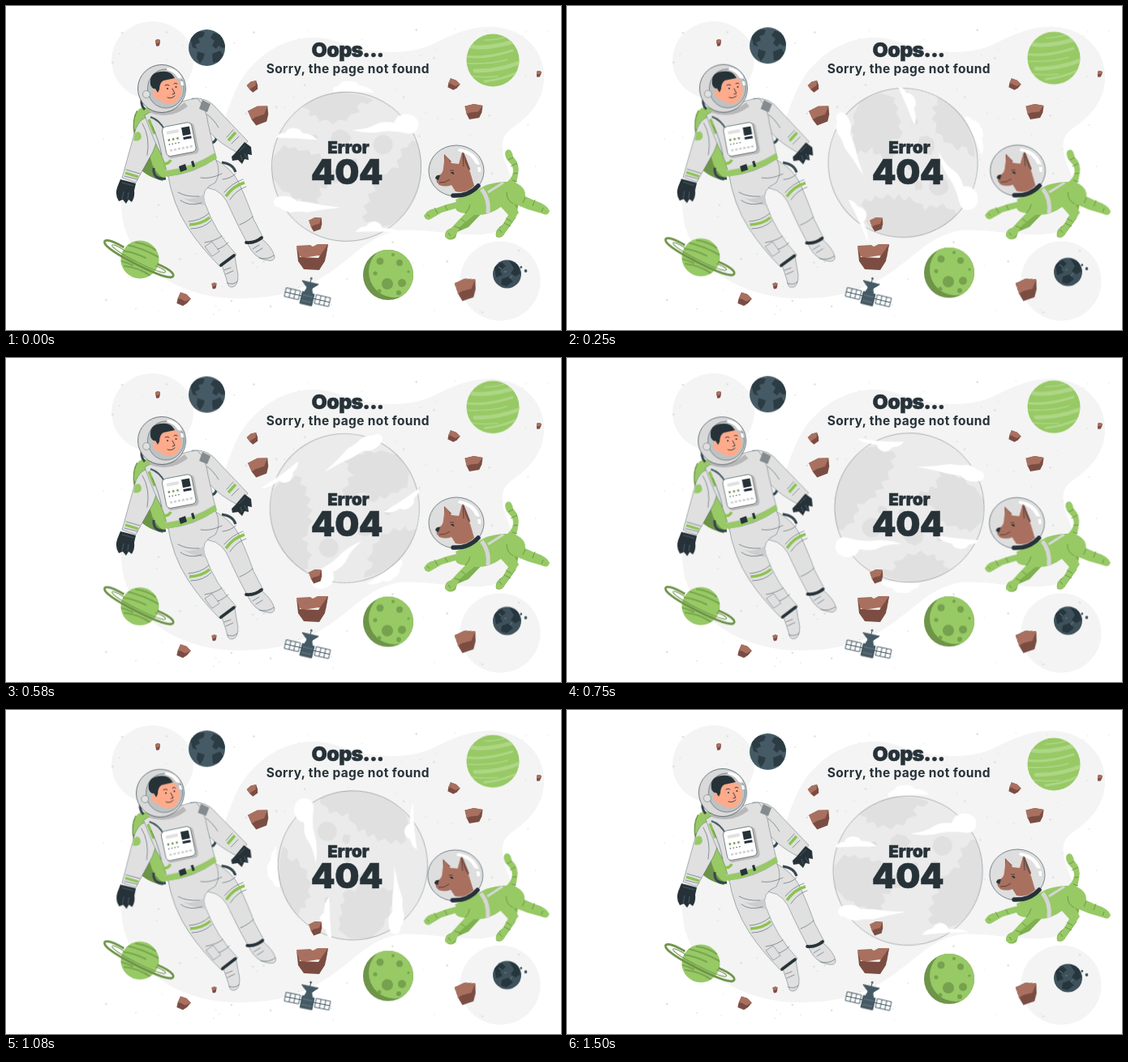
These frames come from a looping animation (684x400 px, 1540 ms). An HTML page:

```html
<!DOCTYPE html>
<html lang="en">
<head>
<meta charset="utf-8">
<title>Page not found</title>
<style>
  html, body { margin: 0; width: 100%; height: 100%; overflow: hidden; background: #fff; }
  svg { display: block; width: 684px; height: 400px; }
  text { font-family: Inter, "Open Sans", sans-serif; fill: #263238; text-anchor: middle; }
  .heavy { font-weight: 900; stroke: #263238; stroke-width: .5; }
  .blob { fill: #f4f4f4; }
  .suit { fill: #e0e0e0; stroke: #37474f; stroke-width: .4; }
  .fold { fill: none; stroke: #455a64; stroke-width: .6; stroke-linecap: round; }
  .dark { fill: #263238; }
  .slate { fill: #455a64; }
  .green { fill: #97c965; }
  .moss { fill: #6d9449; }
  .band { fill: none; stroke: #8bc34f; stroke-width: 3.4; }
  .shade { fill: #cdcdcd; }
  .sea { fill: #e0e0e0; }
  .white { fill: #fff; }
  .skin { fill: #ffab8b; }
  .fur { fill: #a9705f; }
  .fur2 { fill: #7b4d42; }
  #moon { transform-origin: 420.6px 191.5px; }
  #astronaut { transform-origin: 228px 215px; }
  #dog { transform-origin: 600px 275px; }
  #satellite { transform-origin: 371px 357px; }
</style>
</head>
<body>
<svg viewBox="0 0 684 400">
  <defs>
    <clipPath id="disc"><circle cx="419.6" cy="198.3" r="92"/></clipPath>
    <clipPath id="c1"><circle cx="247.5" cy="51.5" r="22.5"/></clipPath>
    <clipPath id="c2"><circle cx="600" cy="67" r="32.5"/></clipPath>
    <clipPath id="c3"><circle cx="165" cy="313" r="23.5"/></clipPath>
    <clipPath id="c4"><circle cx="471" cy="332" r="31"/></clipPath>
    <clipPath id="c5"><circle cx="617.5" cy="331" r="17.5"/></clipPath>
  </defs>

  <g class="blob">
    <ellipse cx="180.5" cy="67" rx="50.5" ry="48"/>
    <ellipse cx="609" cy="339.5" rx="49.5" ry="49"/>
    <path d="M262 158C275 130 280 95 307 70C335 41 375 33 405 43C440 56 485 64 524 48C552 34 572 25 600 25.500C640 29 663 55 663 88C663 120 640 140 622 152C605 165 612 185 620 205C632 235 632 265 610 277C580 290 520 274 485 277C445 283 425 315 385 338C350 357 320 361 285 361C215 360 160 325 145 270C135 225 150 165 200 160C225 157 245 165 262 158Z"/>
  </g>
  <g id="stars" fill="#e2e2e2"></g>

  <g id="moon">
    <circle cx="419.6" cy="198.3" r="92" fill="#ebebeb"/>
    <g class="sea" clip-path="url(#disc)">
      <path d="M343 172l5 4 8-2 5 5 12-1 3 6 10-2 5 8-4 8 8 5 10-1 6 9-3 8-10-1-3 8-9-2 3 10-6 5 4 9-9 5-9-6-6-9-10 1-3-8-9-2-14-19 3-24z"/>
      <path d="M512 168l-12-2-6 8-8 2 2 9-7 6 4 9-9-1-7 8-9 2 3 8-11 3 4 8-10 4 3 9-8 6 5 8-7 5 5 7 11-2 7 7 12-2 28-18 20-38z"/>
      <path d="M365 125Q385 106 412 107Q440 108 452 116L445 121L437 119L432 124L436 131L424 134L419 142L410 140L403 146L394 140L386 143L382 135L373 136L374 129Z"/>
      <path d="M402 157l8-5 10 3 6 8-5 6-9-1-6 4-6-7zM446 192l6-4 7 3-2 8-9-2zM424 190q6-4 9 1q-1 7-8 5z"/>
      <circle cx="464.500" cy="171" r="12"/>
      <circle cx="380" cy="163" r="4"/>
    </g>
    <circle cx="419.6" cy="198.3" r="92" fill="none" stroke="#37474f" stroke-width=".5" stroke-dasharray="1.6 .5"/>
    <g class="white">
      <path d="M402 106Q402 99 410 98Q413 92 422 93Q432 92 435 98Q447 99 453 107Q430 104 402 106Z"/>
      <path d="M427 153Q445 152 454 147Q463 141 478 144Q482 132 495 133Q509 136 508 148Q506 159 494 157Q474 152 456 156Q440 157 427 153Z"/>
      <path d="M333 163Q334 157 344 157Q346 151 354 151Q363 151 365 157Q378 158 384 166Q360 163 333 163Z"/>
      <path d="M330 241Q332 234 343 235Q352 234 358 241Q375 242 390 246L413 249Q390 251 372 255Q360 253 352 255Q342 254 338 249Q329 248 330 241Z"/>
      <path d="M431 279Q436 272 444 272Q449 265 456 266Q463 268 464 274Q478 273 489 280Q460 277 431 279Z"/>
    </g>
  </g>

  <text class="heavy" x="421" y="62.5" font-size="25" letter-spacing="-.7">Oops...</text>
  <text x="421.3" y="83" font-size="15.5" font-weight="700" letter-spacing=".35">Sorry, the page not found</text>
  <text class="heavy" x="422" y="181.5" font-size="20.5">Error</text>
  <text class="heavy" x="420" y="220" font-size="42.500" letter-spacing="-.5">404</text>

  <g class="float">
    <circle class="slate" cx="247.5" cy="51.5" r="22.5"/>
    <path clip-path="url(#c1)" fill="#2c3c44" d="M227 40L235 31L245 32L243 38L237 40L239 45L233 48L236 53L230 51ZM256 33L266 36L272 50L267 52L262 49L259 53L254 49L257 43L252 39ZM236 56L245 59L243 65L239 71L235 64ZM254 59L264 55L268 61L262 69L255 70Z"/>
  </g>
  <g class="float">
    <circle class="green" cx="600" cy="67" r="32.5"/>
    <g clip-path="url(#c2)" fill="none" stroke="#add685" stroke-linecap="round">
      <path stroke-width="5" d="M574 50Q594 54 632 42M578 80Q606 81 638 68"/>
      <path stroke-width="3" d="M565 62Q590 66 624 55M590 93Q610 91 628 83"/>
      <path stroke-width="1.6" d="M590 42Q605 42 616 38M568 71Q600 72 618 66M570 86Q586 89 606 87"/>
    </g>
  </g>
  <g class="float">
    <circle class="green" cx="165" cy="313" r="23.5"/>
    <g clip-path="url(#c3)" fill="none" stroke="#79a651" stroke-width="2.2" stroke-linecap="round">
      <path d="M150 295Q168 299 188 310M160 292Q174 294 184 301M143 302Q158 304 172 311M146 321Q164 323 178 333M142 315Q150 317 156 320"/>
    </g>
    <g transform="rotate(26.500 163.5 312)" fill="none" stroke="#6d9449">
      <path stroke-width="2.8" d="M141 307.500C119 306 113 310 118 314C130 321 196 321 209 315C215 311 209 306 187 307.500"/>
      <path stroke-width="1" d="M142 310.500C129 309 124 311 128 313C140 317.500 188 317.500 199 313.500C203 311 198 309 186 310.500"/>
    </g>
  </g>
  <g class="float">
    <circle class="moss" cx="471" cy="332" r="31"/>
    <circle class="green" cx="479" cy="328" r="32" clip-path="url(#c4)"/>
    <g fill="#76a14e">
      <circle cx="461" cy="315" r="4.500"/><circle cx="485" cy="317" r="4"/><circle cx="470" cy="343" r="7"/>
      <circle cx="488" cy="342" r="5"/><circle cx="477" cy="307" r="2"/><circle cx="455" cy="330" r="2.500"/>
      <circle cx="484" cy="354" r="3"/><circle cx="496" cy="328" r="1.600"/><circle cx="460" cy="352" r="2.500"/>
    </g>
  </g>
  <g class="float">
    <circle cx="617.5" cy="331" r="17.5" fill="#3f525c"/>
    <path clip-path="url(#c5)" fill="#26363e" d="M602 322L611 316L616 321L609 327L612 332L604 335ZM620 314L631 319L634 330L628 334L622 330L626 324ZM611 337L619 334L625 340L617 346L610 344Z"/>
    <path d="M607 322l4 3M621 336l3-3M614 328h3" stroke="#64808d" stroke-width="1"/>
    <circle class="slate" cx="634.8" cy="322.5" r="1.4"/>
    <circle class="slate" cx="640.5" cy="327" r="1.9"/>
  </g>

  <g id="rocks"></g>
  <g>
    <path class="fur" d="M358 296L375 295L378 297L384 294L397 294L394 311L385 308L366 311L361 308Z"/>
    <path class="fur2" d="M358 296L362 310L385 311L397 294L393 315L386 326L367 325L360 315Z"/>
  </g>

  <g id="satellite">
    <g transform="rotate(13 372 357)" stroke="#455a64">
      <path class="slate" d="M364.500 354h15v15h-15zM361 341h21l-7 7 2 6h-10l2-6z"/>
      <path fill="none" stroke-width="1" d="M371.500 341v-5M380 359.500h3M365 359.500h-4M344 354h18v11h-18zM344 359.500h18M350 354v11M356 354v11M382 354h18v11h-18zM382 359.500h18M388 354v11M394 354v11"/>
      <path fill="none" stroke="#8298a2" stroke-width=".6" d="M366 358h12M366 365h12"/>
      <circle class="slate" cx="371.500" cy="336" r="1"/>
    </g>
  </g>

  <g id="astronaut">
    <path class="moss" d="M161 129Q154 140 158 160L160 195Q170 210 193 216L204 200L186 140Z"/>
    <path class="green" d="M164 127Q173 123 183 128L204 200L195 213Q182 206 178 188L170 158L158 152Q157 136 164 127Z"/>
    <path fill="none" stroke="#37474f" stroke-width="3" d="M171 128Q164 120 169 112M248 153Q260 154 259 164Q257 170 249 169M182 200Q181 215 197 213M266 193Q280 195 283 205"/>
    <path class="suit" d="M257 189Q278 200 287 218Q299 245 305 263L317 286L298 294Q286 272 277 252Q268 227 250 225Q236 220 236 205Z"/>
    <path class="suit" d="M199 205L258 188Q266 205 258 218Q239 226 245 243Q258 280 284 307L264 322Q240 298 225 275Q205 245 199 205Z"/>
    <path class="suit" d="M174 137Q162 141 158 158L143 212L160 218Q171 198 181 180L189 158Z"/>
    <path class="suit" d="M229 114Q249 112 261 128L298 167L285 181Q264 170 252 157L236 142Z"/>
    <path class="suit" d="M171 135Q184 126 198 127Q218 115 236 114Q247 126 249 145L259 188Q232 207 199 210Q196 190 186 173Q176 150 171 135Z"/>
    <path class="shade" d="M196 203L198 209Q232 206 259 188L257 181Q230 198 196 203ZM218 237Q230 240 243 233L246 246Q232 245 218 237Z"/>
    <path class="green" d="M195 204Q231 199 258 181L260 188Q231 206 198 211ZM159 157Q166 152 167 162Q165 168 157 166Z"/>
    <path class="dark" d="M213 198l8-3 2 7-8 3zM228 192l3-1 2 7-3 1z"/>
    <path class="band" d="M226 270Q242 269 251 261M271 235Q280 222 294 218M147 206L163 211M274 166L283 156M176 140Q180 150 183 158M194 194Q200 196 203 190"/>
    <path class="fold" d="M225 266Q240 265 250 256M269 230Q278 219 292 214M228 275Q243 275 253 265M276 239Q284 227 296 223M148 202L165 207M146 210L162 214M272 162L280 153M278 170L287 161M215 240Q226 248 241 243M212 230Q222 236 238 235M240 212Q252 214 266 207M267 214Q277 213 283 207M168 145Q178 162 174 184M180 148Q188 164 192 184M248 134Q256 140 262 150M245 292Q258 290 266 284M252 303Q266 300 274 292M288 270Q298 266 304 260"/>
    <path class="suit" d="M245 297l9-6 9 12-9 6z"/>
    <path fill="#848b8e" d="M242 116L252 121L248 131L238 127Z"/>
    <path fill="none" stroke="#455a64" stroke-width="2" d="M178 137Q190 141 196 154"/>
    <g transform="rotate(-11 214 166)">
      <rect x="196" y="147" width="39" height="39" rx="5" fill="#bababa"/>
      <rect x="195" y="146" width="37" height="37" rx="5" class="white" stroke="#37474f" stroke-width=".6"/>
      <path class="dark" d="M219 151h10v10h-10zM219 163h10v3h-10z"/>
      <path fill="none" stroke="#e0e0e0" stroke-width="4" d="M200 154h15"/>
      <path fill="none" stroke="#6d9449" stroke-width="2.4" stroke-dasharray="2.4 3" d="M200 163h16"/>
      <path fill="none" stroke="#455a64" stroke-width="1.4" stroke-dasharray="1.4 2.500" d="M200 168.500h15"/>
      <path fill="none" stroke="#d0d0d0" stroke-width="2.600" stroke-dasharray="3 2" d="M200 176h28"/>
    </g>
    <path class="dark" d="M141 214L160 219L158 228Q159 236 155 242L151 239L148 244L144 239L139 241Q134 234 137 224Z"/>
    <path class="dark" d="M283 181L294 168L302 174L303 184L298 183L299 190L294 189L291 195L286 190L279 191L278 186Z"/>
    <path fill="none" stroke="#546e7a" stroke-width=".7" d="M143 218l14 4M145 229l-2 9M151 230l-1 8M287 180l8-8M294 182l3 6M289 184l2 6"/>
    <path class="suit" d="M266 320L282 309Q284 322 286 332Q286 346 279 347Q273 348 272 338Z"/>
    <path class="suit" d="M298 294L316 288Q328 298 331 309Q331 316 322 314Q306 312 298 294Z"/>
    <path class="fold" d="M269 326l8-3M271 331l9-4M273 342q7 3 12-2M304 300l8-5M308 304l8-5M312 311q10 3 18-3"/>
    <path fill="none" stroke="#263238" stroke-width="3.800" stroke-linecap="round" d="M265 320L281 308M296 292Q307 293 315 286"/>
    <path fill="#b8b8b8" d="M176 126Q200 137 220 119L224 124Q202 141 178 132Z"/>
    <circle cx="192" cy="102" r="29.500" fill="#d9d9d9" stroke="#37474f" stroke-width=".7"/>
    <ellipse cx="197" cy="102" rx="22.500" ry="24" fill="#bfc1c2" stroke="#455a64" stroke-width=".6"/>
    <path class="skin" d="M184 94Q192 84 207 88Q215 93 216 105Q214 118 205 121Q195 121 188 115Q180 113 181 106Q182 102 186 104Z"/>
    <path class="dark" d="M178 97Q176 82 191 81Q203 79 208 89Q199 91 194 92Q189 95 189 103L187 107L184 102Q180 103 178 97Z"/>
    <path fill="none" stroke="#263238" stroke-width=".9" stroke-linecap="round" d="M196 98q3-2 5 0M207 96q2-2 4 0M199 113q5 2 9-2M205 102l3 6-3 1"/>
    <circle class="dark" cx="199" cy="102" r="1"/><circle class="dark" cx="209.500" cy="100" r="1"/>
    <path class="white" d="M199 76Q213 78 217 90L212 89Q207 81 198 79ZM215 93l3 0 1 5-3 0z"/>
    <circle class="suit" cx="173" cy="109" r="4.500"/>
  </g>

  <g id="dog">
    <ellipse cx="555" cy="203.500" rx="34" ry="31.500" fill="#dedede" stroke="#455a64" stroke-width=".7"/>
    <path class="fur2" d="M540 198L540 183L549 192ZM559 194L563 178L572 201L568 212Z"/>
    <path class="fur" d="M539 200L541 184L549 194L558 195L563 178Q564 194 572 205L577 222Q567 232 554 229L549 221Q542 224 534 221Q528 216 532 210Q539 207 539 200Z"/>
    <path class="dark" d="M529 213Q530 208 535 209L533 215ZM548 206a2 2 0 1 1 4 2z"/>
    <path fill="none" stroke="#263238" stroke-width=".7" d="M534 218Q541 219 547 214M547 203l5 0M563 182l1 16"/>
    <path class="white" d="M558 176Q578 178 584 196L579 195Q573 182 557 179ZM581 199l4 0 0 6-3 0z"/>
    <g fill="#7fb04f">
      <path d="M571 248L559 268L551 274Q541 275 541 284Q546 292 554 286L556 279L570 273L588 254Z"/>
      <path d="M616 243L621 258L612 270Q602 276 604 285Q611 288 615 280L628 262L632 243Z"/>
    </g>
    <g class="green">
      <path d="M617 218Q629 207 623 196L617 189Q613 181 617 178Q623 175 625 186Q634 195 631 208Q630 220 622 227Z"/>
      <path d="M554 239Q575 230 592 221Q615 214 630 219Q641 225 640 235L651 240Q667 245 670 253Q668 260 660 256L643 251L626 244L632 255L619 273L614 281Q610 287 604 284Q604 277 611 272L619 258L610 248Q596 259 577 258L560 272L554 283Q548 291 541 285Q541 277 548 275L559 263L566 256Q555 255 554 250L537 255L525 262Q518 267 515 259Q519 251 529 250L543 245L555 242Z"/>
    </g>
    <path fill="none" stroke="#d5d5d5" stroke-width="5" d="M586 226Q596 238 594 256"/>
    <path fill="none" stroke="#d5d5d5" stroke-width="3" d="M594 230L613 218"/>
    <path fill="none" stroke="#5c813c" stroke-width=".7" d="M553 272l8 3M528 249l4 7M614 268l8 4M652 239l-3 8M566 256Q571 251 572 245M625 244Q617 240 617 230M619 190l6-3M622 198l8-4M625 207l6-1M624 215l6 2M541 246l3 6M640 236l-3 7M561 263l5 4M616 262l7 4M519 257l3 3M545 280l3 4M608 276l3 4M662 249l-2 5"/>
    <path fill="none" stroke="#263238" stroke-width="5.500" stroke-linecap="round" d="M551 234Q570 235 582 222"/>
  </g>
</svg>
<script>
const LOOP = 1540;
const $ = id => document.getElementById(id);

function add(parent, tag, attrs) {
  const el = document.createElementNS('http://www.w3.org/2000/svg', tag);
  for (const k in attrs) el.setAttribute(k, attrs[k]);
  parent.append(el);
  return el;
}

// Faint star field
let seed = 41;
const rnd = () => (seed = seed * 16807 % 2147483647) / 2147483647;
for (let i = 0; i < 190; i++) {
  const cx = 120 + rnd() * 550, cy = 22 + rnd() * 362;
  add($('stars'), 'circle', { cx, cy, r: rnd() < .2 ? 1.4 : .4 + rnd() * .5 });
}

// Rocks: centre x, centre y, width, height, tilt
const rocks = [
  [187, 45.5, 6, 9, 0], [304.5, 99.5, 13, 13, -25], [312, 135, 25, 23, -12],
  [551, 97, 14, 13, 35], [576.5, 130.500, 22, 19, 0], [656.5, 84, 6, 8, 10],
  [382, 269.5, 16, 17, -8], [218, 362.500, 15, 16, 35], [256.500, 345.500, 6, 8, 0],
  [567, 350, 26, 27, -8]
];
for (const [x, y, w, h, tilt] of rocks) {
  const g = add($('rocks'), 'g', {
    transform: `translate(${x} ${y}) rotate(${tilt}) scale(${w / 20} ${h / 20})`
  });
  add(g, 'path', { class: 'fur2', d: 'M-10 -7L0 -10L10 -8L9 1L6 8L-5 10L-8 3Z' });
  add(g, 'path', { class: 'fur', d: 'M-10 -7L0 -10L10 -8L5 0L-4 1L-8 3Z' });
}

// Time in ms, moon turn in degrees, float in px, sway in degrees
const steps = [
  [0, 0, 0, 0], [250, 64, -2.7, .45], [580, 143, -6.4, .05], [720, 176, -6.9, -.35],
  [880, 213, -6.1, -.7], [1080, 264, -3.7, -1], [1330, 324, -1, -.5],
  [1500, 355.5, -.1, -.05], [LOOP, 360, 0, 0]
];

function play(el, pose) {
  const frames = steps.map(s => ({ offset: s[0] / LOOP, transform: pose(s) }));
  el.animate(frames, { duration: LOOP, iterations: Infinity });
}

play($('moon'), s => `rotate(${s[1]}deg)`);
document.querySelectorAll('.float').forEach(el => play(el, s => `translateY(${s[2]}px)`));
play($('astronaut'), s => `rotate(${s[3]}deg)`);
play($('dog'), s => `rotate(${s[3]}deg)`);
play($('satellite'), s => `rotate(${s[3] * 1.5}deg)`);
</script>
</body>
</html>
```
